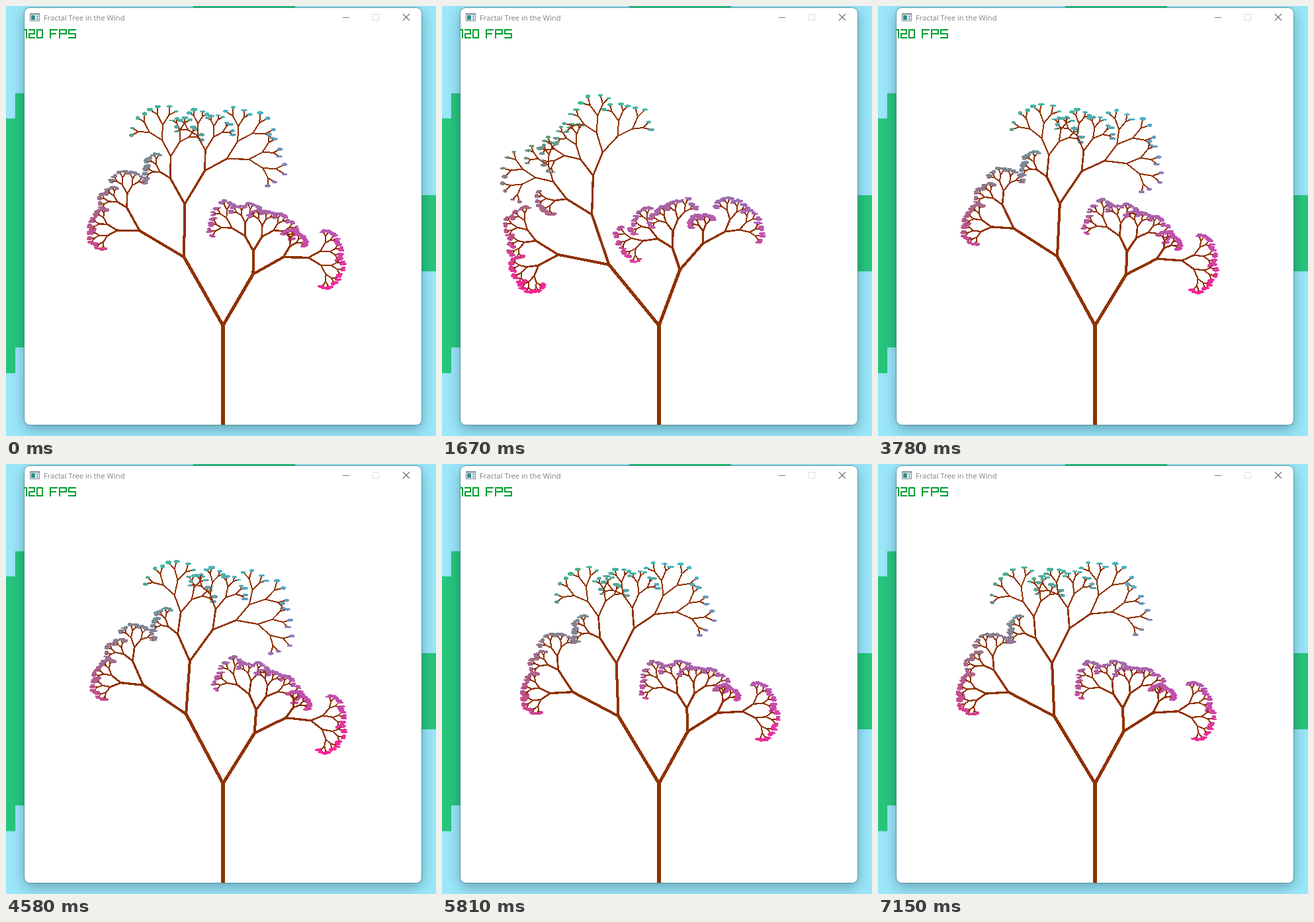
Write an HTML page that moves like this. It is 650x650 px and loops after 7.18 s.

```html
<!DOCTYPE html>
<html lang="en">
<head>
<meta charset="utf-8">
<title>Fractal Tree in the Wind</title>
<style>
html, body { margin: 0; width: 100%; height: 100%; overflow: hidden; }
body { position: relative; background: #9be6f9; }
.block { position: absolute; background: #27c67c; box-shadow: 0 0 1px rgba(60, 175, 150, .6); }
.window {
  position: absolute; left: 28px; top: 3px; width: 600px; height: 630px;
  background: #fff; border-radius: 8px;
  box-shadow: 0 0 0 1px rgba(70, 125, 135, .65), 0 6px 20px rgba(0, 45, 65, .38);
}
.title {
  position: absolute; left: 57px; top: 10px; line-height: 16px; white-space: nowrap;
  font-family: "Open Sans", "Noto Sans", sans-serif; font-size: 11.2px; color: #808088;
}
svg { position: absolute; left: 0; top: 0; display: block; }
</style>
</head>
<body>
<div class="block" style="left:0;top:170px;width:14px;height:385px"></div>
<div class="block" style="left:14px;top:132px;width:14px;height:384px"></div>
<div class="block" style="left:283px;top:-4px;width:154px;height:7px"></div>
<div class="block" style="left:628px;top:286px;width:30px;height:115px"></div>
<div class="window"></div>
<div class="title">Fractal Tree in the Wind</div>
<svg width="650" height="650" fill="none">
  <g shape-rendering="crispEdges">
    <path fill="#7d8a94" d="M36 11h15v12h-15z"/>
    <path fill="#f2f5f6" d="M37 13h13v9h-13z"/>
    <path fill="#2f8f8c" d="M38 14h6v7h-6z"/>
    <path fill="#8eb4c4" d="M46 14h3v3h-3zM46 18h3v3h-3z"/>
    <path stroke="#777" d="M509 17.5h10"/>
    <path stroke="#ddd" d="M554.5 12.5h9v9h-9z"/>
    <g id="tree" stroke="#903200"></g>
    <path role="img" aria-label="120 FPS" stroke="#009e2f" stroke-width="2"
      d="M28 36h3v13M34 36h9v6h-8v6h9M47 36h8v12h-8zM67 49V36h11M67 42h9M81 49V36h10v6h-10M106 36h-11v6h10v6h-11"/>
  </g>
  <path stroke="#6d6d6d" stroke-width="1.1" d="M600 12l10 10M610 12l-10 10"/>
</svg>
<script>
const LOOP = 7180, DEPTH = 8, RAD = Math.PI / 180;
const tree = document.getElementById("tree");

// Main boughs, level by level, left before right; twigs follow a rule.
const boughs = [
  150,
  119, 90,
  78, 80, 35, 52.5,
  34, 40, 45, 59, 26, 25, 19, 38,
  17, 18, 17, 21, 18, 33, 31, 38, 23, 20, 17, 20, 11, 11, 20, 22
];

// Turning points of the wind: [time, degrees per level].
const gusts = [
  [0, .35], [180, -1.2], [760, 2.6], [1330, 2.8], [1690, -9.5],
  [2500, .9], [3080, -2], [3360, 2.8], [3600, 1.2], [4440, 2.8],
  [4980, -2.1], [5400, 2.8], [6000, -2.2], [6720, 2], [LOOP, -1.2]
];

function noise(n) {
  const v = Math.sin(n * 127.1) * 43758.5;
  return v - Math.floor(v);
}

function wind(t) {
  const k = gusts.findIndex(g => g[0] > t);
  const [t0, a] = gusts[k - 1], [t1, b] = gusts[k];
  return a + (b - a) * (1 - Math.cos(Math.PI * (t - t0) / (t1 - t0))) / 2;
}

function set(el, attrs) {
  for (const name in attrs) el.setAttribute(name, attrs[name]);
}

function add(tag, attrs) {
  const el = document.createElementNS("http://www.w3.org/2000/svg", tag);
  set(el, attrs);
  return tree.appendChild(el);
}

// Longer branches keep more of their length.
function twigLength(parent, i) {
  return parent * (.55 + .007 * parent) * (.88 + .24 * noise(i));
}

function grow(i, depth, parent) {
  const len = boughs[i - 1] || twigLength(parent, i);
  const node = { len, line: add("line", { "stroke-width": Math.max(2, 6 * .82 ** depth) }) };
  if (depth < DEPTH) {
    node.kids = [grow(2 * i, depth + 1, len), grow(2 * i + 1, depth + 1, len)];
  } else {
    node.leaf = add("ellipse", {
      rx: 3 + 2.5 * noise(i + 600), ry: 1.3 + 1.5 * noise(i + 1200), stroke: "none"
    });
  }
  return node;
}

// Red grows downwards, green upwards, blue to the upper right.
function leafColor(x, y) {
  const k = (430 - y) / 190;
  const r = 65 + (y - 150) * .66, g = 185 - (y - 150) * .53;
  const b = 153 + k * (12 + (x - 290) * .21);
  return `rgb(${r | 0},${g | 0},${b | 0})`;
}

function pose(node, x1, y1, angle, w) {
  const x2 = x1 + node.len * Math.sin(angle * RAD);
  const y2 = y1 - node.len * Math.cos(angle * RAD);
  set(node.line, { x1, y1, x2, y2 });
  if (node.leaf) return set(node.leaf, { cx: x2, cy: y2, fill: leafColor(x2, y2) });
  pose(node.kids[0], x2, y2, angle - 30 + w, w);
  pose(node.kids[1], x2, y2, angle + 30 + w, w);
}

const trunk = grow(1, 0);
const start = performance.now();
function draw() {
  const t = (performance.now() - start) % LOOP;
  pose(trunk, 328, 633, 0, wind(t));
  requestAnimationFrame(draw);
}
draw();
</script>
</body>
</html>
```
